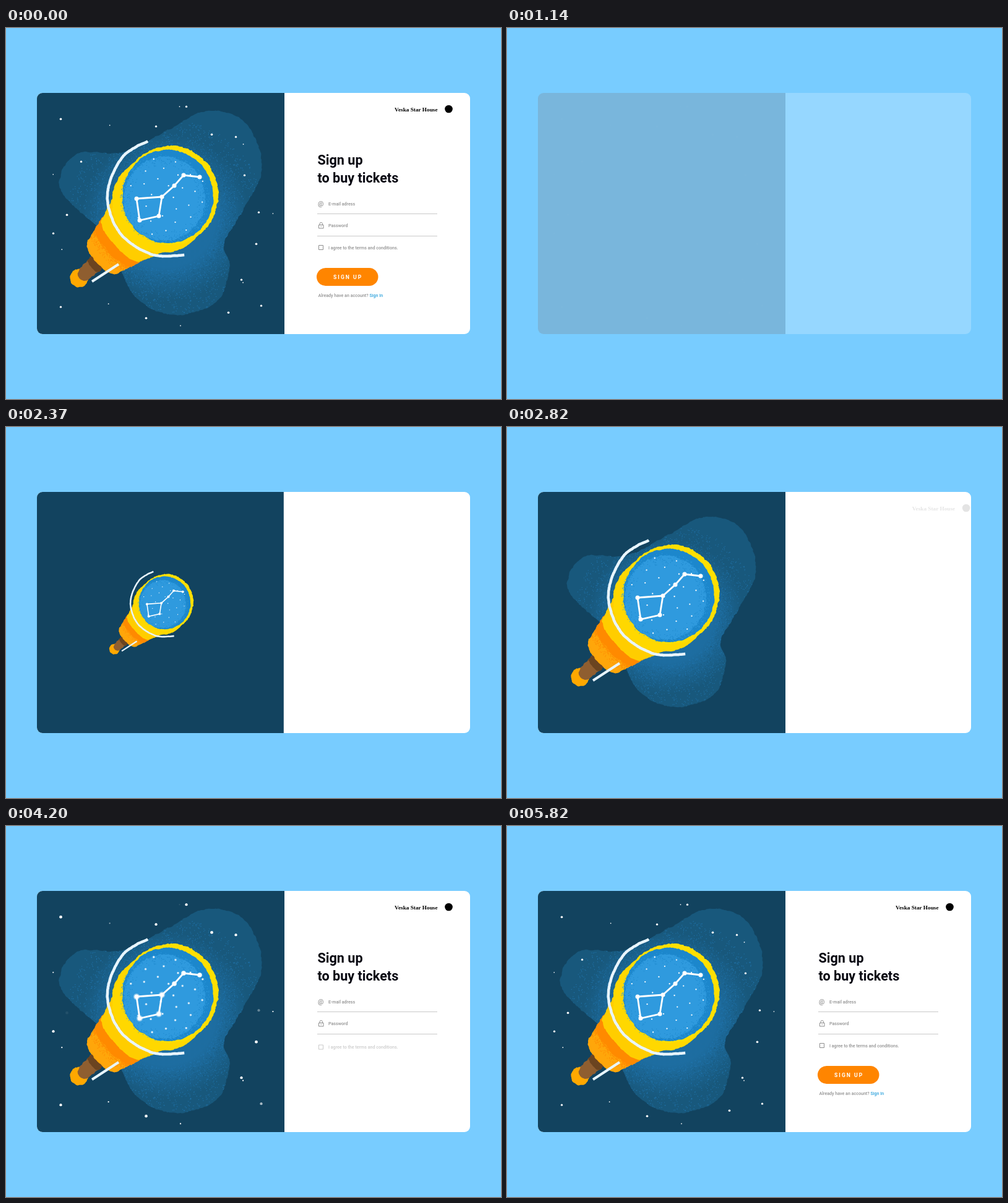
Write an HTML page that moves like this. It is 800 px wide and 600 px high and loops after 5.85 s.

```html
<!DOCTYPE html>
<html lang="en">
<head>
<meta charset="utf-8">
<title>Sign up</title>
<style>
html, body { margin: 0; height: 100%; overflow: hidden; background: #78ccff; }
svg { display: block; width: 100vw; height: 100vh; }
text { font: 500 7.1px Roboto, sans-serif; fill: #929292; }
.title text { font-size: 21.6px; font-weight: 600; fill: #060610; }
.brand { font: bold 9.25px "Liberation Serif", serif; fill: #000; }
.icon { fill: none; stroke: #8e8e8e; }
.rule { stroke: #c9c9c9; }
</style>
</head>
<body>
<svg viewBox="0 0 800 600">
  <defs>
    <clipPath id="cardClip"><rect x="50" y="105" width="700" height="390" rx="9"/></clipPath>
    <clipPath id="blobClip"></clipPath>
    <clipPath id="tubeClip"></clipPath>
    <radialGradient id="halo" gradientUnits="userSpaceOnUse" cx="258" cy="306" r="135">
      <stop offset=".6" stop-color="#1f74ad"/>
      <stop offset="1" stop-color="#1f74ad" stop-opacity="0"/>
    </radialGradient>
  </defs>
  <rect id="card" x="50" y="105" width="700" height="390" rx="9" fill="#fff"/>
  <path id="night" d="M450 105H59a9 9 0 0 0-9 9V486a9 9 0 0 0 9 9H450z" fill="#12435f"/>
  <g id="nebula"></g>
  <g id="scope"></g>
  <g id="stars" fill="#fff"></g>
  <g clip-path="url(#cardClip)">
    <g class="step">
      <text class="brand" x="697.5" y="135" text-anchor="end">Veska Star House</text>
      <circle cx="715.5" cy="131" r="6.3"/>
    </g>
    <g class="step title">
      <text x="503.5" y="221">Sign up</text>
      <text x="503.5" y="249.5">to buy tickets</text>
    </g>
    <g class="step">
      <text x="504" y="287.5" style="font-size:10.5px">@</text>
      <text x="521" y="286.5">E-mail adress</text>
      <path class="rule" d="M503 300.5H697"/>
    </g>
    <g class="step">
      <path class="icon" d="M505.5 318.5h7.5v5.5h-7.5zM507 318v-1.3a2.2 2.2 0 0 1 4.4 0V318M509.2 320.5v1.5"/>
      <text x="521" y="322">Password</text>
      <path class="rule" d="M503 336.5H697"/>
    </g>
    <g class="step">
      <path class="icon" d="M505.5 351.5h7v7h-7z"/>
      <text x="521" y="357.5">I agree to the terms and conditions.</text>
    </g>
    <g class="step">
      <rect x="502" y="388" width="99.5" height="29" rx="14.5" fill="#ff8500"/>
      <text x="529" y="405.7" style="font-size:8.7px;font-weight:700;letter-spacing:2px;fill:#fff">SIGN UP</text>
    </g>
    <g class="step">
      <text x="504.5" y="435">Already have an account? <tspan fill="#2fa3dc">Sign In</tspan></text>
    </g>
  </g>
</svg>
<script>
const LOOP = 5850, TAU = 2 * Math.PI;
const $ = id => document.getElementById(id);
let seed = 7;
const rnd = () => (seed = (seed * 16807) % 2147483647) / 2147483647;

function add(parent, tag, attrs) {
  const el = document.createElementNS('http://www.w3.org/2000/svg', tag);
  for (const k in attrs) el.setAttribute(k, attrs[k]);
  parent.append(el);
  return el;
}

const pairs = list => list.match(/\d+ \d+/g).map(p => p.split(' ').map(Number));

// Smooth curve through key points
function curve(list, closed) {
  const p = pairs(list), n = p.length;
  const at = i => closed ? p[(i + n) % n] : p[Math.max(0, Math.min(n - 1, i))];
  let d = 'M' + p[0];
  for (let i = 0; i < n - (closed ? 0 : 1); i++) {
    const [a, b, c, e] = [at(i - 1), at(i), at(i + 1), at(i + 2)];
    const c1 = b.map((v, k) => v + (c[k] - a[k]) / 6);
    const c2 = c.map((v, k) => v - (e[k] - b[k]) / 6);
    d += `C${c1} ${c2} ${c}`;
  }
  return d + (closed ? 'z' : '');
}

const oval = (x, y, rx, ry) => `M${x - rx} ${y}a${rx} ${ry} 0 1 1 ${2 * rx} 0a${rx} ${ry} 0 1 1 ${-2 * rx} 0z`;

// Brushy, slightly torn outline
function rough(d, amp = 1.5) {
  const path = document.createElementNS('http://www.w3.org/2000/svg', 'path');
  path.setAttribute('d', d);
  const len = path.getTotalLength(), out = [];
  let dx = 0, dy = 0;
  for (let s = 0; s < len; s += 2.2) {
    const p = path.getPointAtLength(s);
    dx = dx * .5 + (rnd() - .5) * amp;
    dy = dy * .5 + (rnd() - .5) * amp;
    out.push((p.x + dx).toFixed(1) + ' ' + (p.y + dy).toFixed(1));
  }
  return 'M' + out.join('L') + (d.endsWith('z') ? 'z' : '');
}

const shape = (g, d, fill, amp) => add(g, 'path', { d: rough(d, amp), fill });

function grain(g, count, fill, place, clip) {
  let d = '';
  for (let i = 0; i < count; i++) {
    const [x, y] = place();
    d += `M${x.toFixed(1)} ${y.toFixed(1)}h1.1v1.1h-1.1z`;
  }
  add(g, 'path', { d, fill, 'clip-path': clip ? `url(#${clip})` : 'none' });
}

const ring = (x, y, r0, spread, pow) => () => {
  const a = rnd() * TAU, r = r0 + spread * rnd() ** pow;
  return [x + r * Math.cos(a), y + r * Math.sin(a)];
};

const nebula = $('nebula');
const cloud = rough(curve('325 134 386 153 414 225 381 298 352 350 361 385 340 443 268 464 205 430 165 340 105 284 86 248 115 203 190 201 262 165', true));
add($('blobClip'), 'path', { d: cloud });
add(nebula, 'path', { d: cloud, fill: '#18587c' });
add(nebula, 'path', { d: cloud, fill: 'url(#halo)', opacity: .75 });
grain(nebula, 3000, '#1f74ad', ring(258, 306, 85, 75, 1.3), 'blobClip');
grain(nebula, 1500, '#18587c', ring(258, 306, 90, 50, .7), 'blobClip');

// Point on the telescope: distance down its axis from the lens, offset across it
const along = (dist, off) => [265.5 - .737 * dist + .676 * off, 270.5 + .676 * dist + .737 * off];

// Tapered tube section with a rounded far end
function section(d0, w0, d1, w1, depth) {
  const pts = [along(d0, -w0)];
  for (let a = -Math.PI / 2; a < 1.6; a += Math.PI / 16)
    pts.push(along(d1 + depth * Math.cos(a), w1 * Math.sin(a)));
  return 'M' + pts.join('L') + 'L' + along(d0, w0) + 'z';
}

const scope = $('scope');
shape(scope, oval(118, 405, 14.5, 15), '#ffa800');
shape(scope, section(150, 14, 189, 11, 10), '#8f5e30');
shape(scope, section(150, 14, 168, 13, 5), '#6b4420');
const tube = rough(section(100, 48, 145, 37, 17));
add($('tubeClip'), 'path', { d: tube });
add(scope, 'path', { d: tube, fill: '#ffa60a' });
shape(scope, section(100, 48, 122, 44, 14), '#ff8a00', 2);
grain(scope, 500, '#ff8a00', () => {
  const a = (rnd() - .5) * Math.PI;
  return along(122 + 14 * Math.cos(a) + 12 * rnd() ** 2, 44 * Math.sin(a));
}, 'tubeClip');
shape(scope, section(20, 79, 106, 47, 15), '#ffcd00');
shape(scope, section(0, 79, 26, 79, 72), '#ffd800');
shape(scope, oval(265.5, 270.5, 77.5, 80), '#ffdf00', 2);
shape(scope, oval(261.5, 272.5, 73.5, 75.5), '#1c87cc', 1.6);
shape(scope, oval(256, 276, 66, 68), '#2f9ade', 2.5);
grain(scope, 500, '#2f9ade', ring(256, 276, 64, 8, 1.5));
grain(scope, 350, '#1c87cc', ring(256, 276, 67, -14, 1.6));

const line = (d, width, stroke) => add(scope, 'path', { d, fill: 'none', stroke, 'stroke-width': width });
line(rough(curve('229 183 187 210 164 270 183 330 235 366 289 367'), .6), 4.5, '#e8f5ff');
line('M139 410L182 382', 4, '#e8f5ff');

// Constellation and the faint stars behind it
const dipper = '211 276 216 311 247 304 252 273 272 255 287 238 313 241';
line(`M${dipper}M211 276L252 273`, 2.8, '#fff');
const sky = add(scope, 'g', { fill: '#fff' });
const glow = add(scope, 'g', { fill: '#fff' });
const dot = (g, [cx, cy], r) => add(g, 'circle', { cx, cy, r });
pairs(dipper).forEach((p, i) => {
  dot(sky, p, 3.5);
  dot(glow, p, i < 4 ? 5.2 : 4);
});
for (let i = 0; i < 29; i++) {
  const r = 66 * Math.sqrt((i + rnd()) / 29), a = 2.4 * i;
  const p = [261 + r * Math.cos(a), 274 + r * Math.sin(a)];
  dot(sky, p, 1.15);
  dot(glow, p, 2);
}

// Bright stars in order of appearance, then small ones scattered around the edge
const stars = pairs('88 147 291 127 242 159 332 172 371 176 76 332 404 349 380 407 88 451 226 469 412 449 408 298 98 302 121 216 385 238 359 460')
  .map(([x, y], i) => ({ p: [x + .5, y + .2], r: i % 3 ? 1.9 : 2.1, start: 3270 + i * 76 }));
for (let i = 0; i < 9; i++) {
  const a = i * TAU / 9, r = 160 + 25 * rnd();
  stars.push({ p: [250 + r * Math.cos(a), 300 + r * Math.sin(a)], r: 1, start: 3400 + i * 110 });
}
for (const s of stars) s.el = dot($('stars'), s.p, s.r);

const steps = [...document.querySelectorAll('.step')];
const span = (t, start, dur) => Math.max(0, Math.min(1, (t - start) / dur));
const easeOut = p => 1 - (1 - p) ** 2;
const zoom = (x, y, sx, sy = sx) => `translate(${x} ${y}) scale(${sx} ${sy}) translate(${-x} ${-y})`;
const set = (el, opacity, transform = '') => {
  el.setAttribute('opacity', opacity);
  el.setAttribute('transform', transform);
};

function draw(t) {
  const leaving = t < 1400;
  const grow = (start, dur) => leaving ? 1 : easeOut(span(t, start, dur));
  const fade = (start, dur) => leaving ? 1 - span(t, start, dur) : 1;

  const body = fade(750, 500), art = fade(240, 540);
  set($('card'), body, zoom(400, 300, grow(1463, 570)));
  set($('night'), body, zoom(50, 300, grow(1832, 570), 1));
  set($('scope'), art, zoom(250, 300, grow(2200, 500)));
  set($('nebula'), art, zoom(250, 300, grow(2400, 570)));
  set(glow, .4 * Math.sin(Math.PI * span(t, 3700, 1000)) ** 2);

  const pulse = 1 - .14 * Math.cos(5 * TAU * t / LOOP);
  for (const { el, r, start } of stars) {
    el.setAttribute('r', r * pulse);
    set(el, leaving ? fade(700, 450) : span(t, start, 270));
  }

  steps.forEach((el, i) => {
    const p = span(t, 2770 + i * 300, 500);
    const off = leaving ? 0 : 1 - easeOut(p);
    set(el, leaving ? fade(270, 600) : p, i ? `translate(0 ${9 * off})` : `translate(${33 * off} 0)`);
  });
}

function frame(now) {
  draw(now % LOOP);
  requestAnimationFrame(frame);
}
draw(0);
requestAnimationFrame(frame);
</script>
</body>
</html>
```
